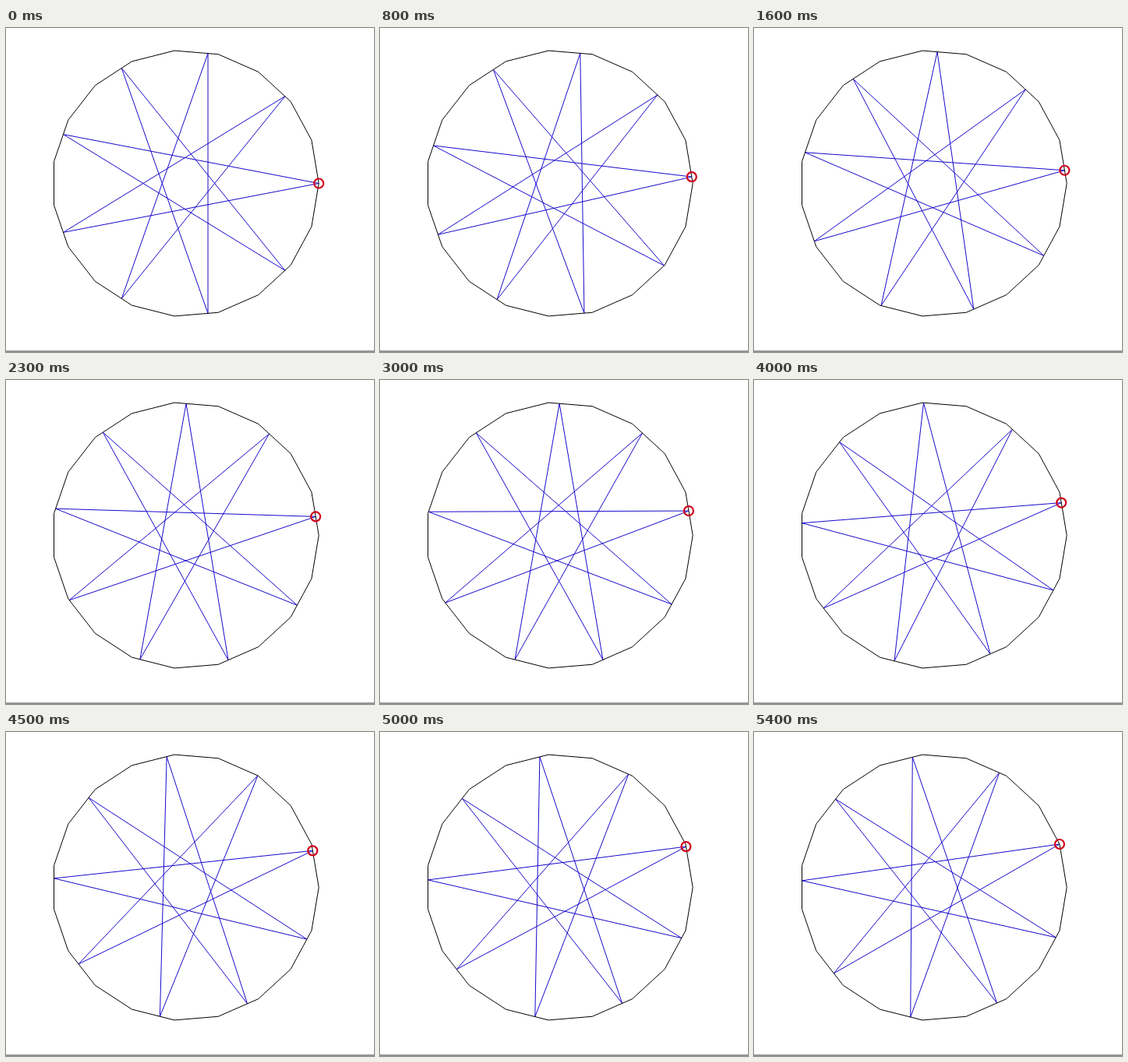
Animation of 472x416 px, one loop 5500 ms. Source, as an HTML page:

```html
<!DOCTYPE html>
<html lang="en">
<head>
<meta charset="utf-8">
<title>Equilateral star in a polygon</title>
<style>
  html, body { margin: 0; width: 100%; height: 100%; overflow: hidden; background: #fff; }
  svg { display: block; }
  polygon { fill: none; }
</style>
</head>
<body>
<svg width="472" height="416" viewBox="0 0 472 416">
  <rect y="414" width="472" height="2" fill="#959595"/>
  <polygon id="star" stroke="#1808cc"/>
  <polygon id="rim" stroke="#000"/>
  <circle id="ring" r="6" fill="none" stroke="#d0021b" stroke-width="2.2"/>
</svg>
<script>
const SIDES = 19, POINTS = 9, TURNS = 4;
const CX = 230.2, CY = 199.5, RADIUS = 171;
const STEP_MS = 100, STEPS = 55, MOVES = 53;
const [star, rim, ring] = ['star', 'rim', 'ring'].map(id => document.getElementById(id));

function vertex(k) {
  const a = 2 * Math.PI * k / SIDES;
  return [CX + RADIUS * Math.cos(a), CY - RADIUS * Math.sin(a)];
}

// Point on the rim, with s counted in sides.
function rimPoint(s) {
  const k = Math.floor(s), f = s - k;
  const a = vertex(k), b = vertex(k + 1);
  return [a[0] + (b[0] - a[0]) * f, a[1] + (b[1] - a[1]) * f];
}

function bisect(lo, hi, isBelow) {
  for (let i = 0; i < 40; i++) {
    const mid = (lo + hi) / 2;
    if (isBelow(mid)) lo = mid; else hi = mid;
  }
  return (lo + hi) / 2;
}

// Far end of a chord of the given length that starts at s.
function chordEnd(s, length) {
  const [x, y] = rimPoint(s);
  return bisect(s + 7, Math.round(s + 9), e => {
    const [ex, ey] = rimPoint(e);
    return Math.hypot(ex - x, ey - y) < length;
  });
}

function walk(start, length) {
  const stops = [start];
  for (let i = 0; i < POINTS; i++) stops.push(chordEnd(stops[i], length));
  return stops;
}

// The chord length that brings the walk back to its start.
function closedStar(start) {
  const goal = start + TURNS * SIDES;
  const length = bisect(320, 340, l => walk(start, l)[POINTS] < goal);
  return walk(start, length).slice(0, POINTS).map(rimPoint);
}

let shown = -1;
function draw(now) {
  const step = Math.floor(now / STEP_MS) % STEPS;
  if (step !== shown) {
    shown = step;
    const points = closedStar(Math.min(1, step / MOVES));
    star.setAttribute('points', points.join(' '));
    ring.setAttribute('cx', points[0][0]);
    ring.setAttribute('cy', points[0][1]);
  }
  requestAnimationFrame(() => draw(performance.now() - begin));
}

rim.setAttribute('points', Array.from({ length: SIDES }, (_, k) => vertex(k)).join(' '));
const begin = performance.now();
draw(0);
</script>
</body>
</html>
```
